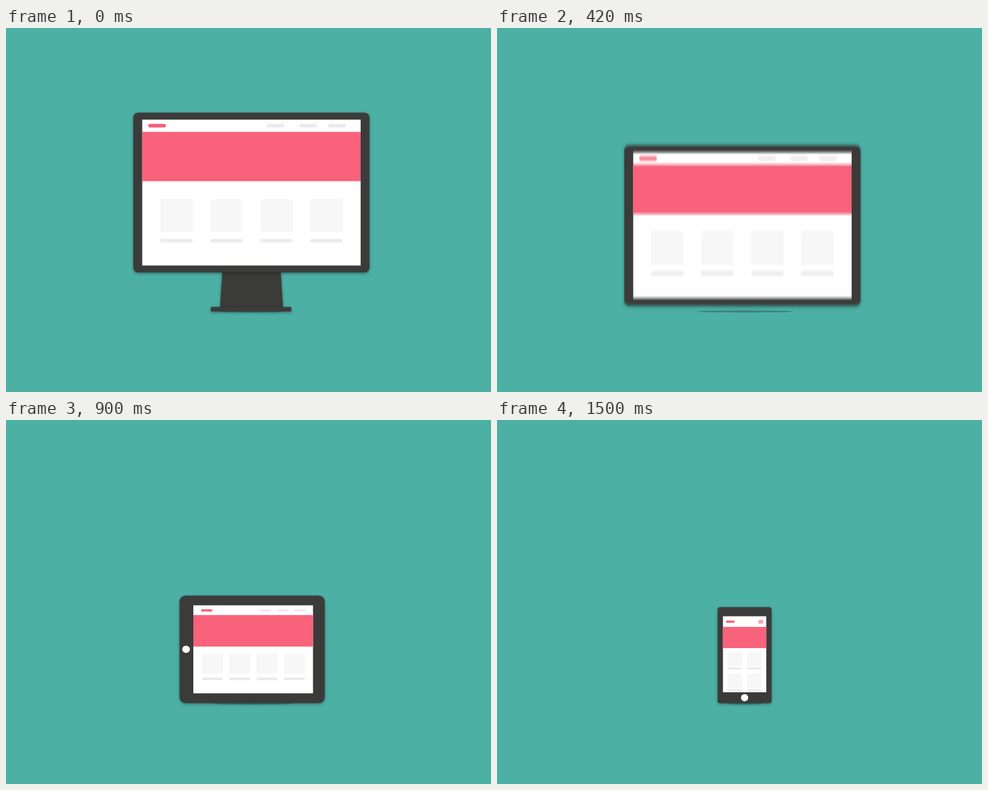
Animation, 800 px wide and 600 px high, one loop 1.68 s. Source, as an HTML page with a canvas:

```html
<!DOCTYPE html>
<html lang="en">
<head>
<meta charset="utf-8">
<title>Responsive devices</title>
<style>
  html, body { margin: 0; width: 100%; height: 100%; overflow: hidden; background: #4db0a5; }
  canvas { display: block; }
</style>
</head>
<body>
<canvas id="stage" width="800" height="600"></canvas>
<script>
const LOOP = 1680, STEP = 30;
const TEAL = '#4db0a5', DARK = '#3b3b3a', PINK = '#f8627b', LINE = '#ebebeb', CARD = '#f7f7f7';

const stage = document.getElementById('stage').getContext('2d');
const layer = document.createElement('canvas');
layer.width = 800;
layer.height = 600;
const ctx = layer.getContext('2d');

const sine = p => (1 - Math.cos(Math.PI * p)) / 2;
const steep = p => p < .5 ? (2 * p) ** 2.8 / 2 : 1 - (2 - 2 * p) ** 2.8 / 2;

// Value at time t along [time, value] keys, eased between neighbours.
function along(keys, t, ease = sine) {
  if (t <= keys[0][0]) return keys[0][1];
  for (let i = 1; i < keys.length; i++) {
    const [t0, a] = keys[i - 1], [t1, b] = keys[i];
    if (t < t1) return a + (b - a) * ease((t - t0) / (t1 - t0));
  }
  return keys[keys.length - 1][1];
}

function box(color, x, y, w, h, r = 0) {
  ctx.fillStyle = color;
  ctx.beginPath();
  ctx.roundRect(x, y, w, h, r);
  ctx.fill();
}

function oval(color, x, y, rx, ry) {
  ctx.fillStyle = color;
  ctx.beginPath();
  ctx.ellipse(x, y, rx, ry, 0, 0, 7);
  ctx.fill();
}

const pill = (color, x, y, w, h) => box(color, x, y, w, h, h / 2);

function shadowed(draw) {
  ctx.save();
  ctx.shadowColor = 'rgba(0,0,0,.4)';
  ctx.shadowBlur = 5;
  ctx.shadowOffsetY = 1.5;
  draw();
  ctx.restore();
}

// Scales sideways about cx and shifts down by dy.
function placed(cx, scale, dy, draw) {
  ctx.save();
  ctx.translate(cx, dy);
  ctx.scale(scale, 1);
  ctx.translate(-cx, 0);
  draw();
  ctx.restore();
}

function cards(xs, w, y, h, lineY, lineH) {
  for (const x of xs) {
    box(CARD, x, y, w, h, 2);
    pill(LINE, x, lineY, w, lineH);
  }
}

function stand() {
  shadowed(() => {
    ctx.fillStyle = DARK;
    ctx.beginPath();
    ctx.moveTo(357, 400);
    ctx.lineTo(453, 400);
    ctx.lineTo(457, 461);
    ctx.lineTo(353, 461);
    ctx.fill();
    box(DARK, 338, 459.7, 132.5, 7.5, 1);
  });
}

function monitor() {
  shadowed(() => box(DARK, 210, 139.5, 389.5, 263.5, 8));
  box('#fff', 224.7, 151, 360.3, 240.5);
  pill(PINK, 234.5, 158, 29.3, 6);
  for (const x of [430.3, 483.8, 531.2]) pill(LINE, x, 158, 29.3, 6);
  box(PINK, 224.7, 171.2, 360.3, 81.4);
  cards([254.5, 337, 419.4, 501.6], 53.5, 282, 54, 347.7, 5.8);
}

function tablet() {
  shadowed(() => box(DARK, 286.3, 289.4, 239.4, 177.4, 10));
  oval('#fff', 297, 378, 6.4, 6);
  box('#fff', 309, 305.5, 197.4, 145);
  pill(PINK, 321.5, 312, 19, 3.8);
  for (const x of [418.7, 447, 475.3]) pill(LINE, x, 312, 19, 3.8);
  box(PINK, 309, 321.6, 197.4, 51.8);
  cards([323.2, 368, 413.2, 458.2], 34.8, 385.3, 33, 424.3, 4.6);
}

function phone() {
  shadowed(() => box(DARK, 364, 308.5, 88.8, 158.3, 4));
  oval('#fff', 408.4, 457.8, 6, 6);
  box('#fff', 372.7, 323.5, 71.5, 125.3);
  pill(PINK, 377.8, 330.5, 14.4, 3.8);
  for (const y of [330, 332, 334]) box(PINK, 431.3, y, 7.7, 1.2);
  box(PINK, 372.7, 341, 71.5, 35);
  for (const y of [381.5, 417.5]) cards([380, 412.5], 24.4, y, 24.5, y + 26.3, 3.5);
}

function scene(t) {
  ctx.fillStyle = TEAL;
  ctx.fillRect(0, 0, 800, 600);

  const cx = along([[270, 404], [360, 403], [420, 410], [480, 415], [630, 415], [780, 407], [1260, 408]], t);
  const rx = along([[270, 52], [360, 35], [420, 80], [480, 105], [630, 105], [780, 65], [1140, 65], [1230, 30]], t);
  oval('rgba(20,40,40,.32)', cx, 467.3, rx, 1.7);

  if (t < 780) {
    const fall = along([[300, 0], [480, 64.4]], t, steep);
    const lift = along([[270, 0], [360, -64]], t);
    if (t < 360) placed(404, 1, lift, stand);
    placed(404.8, along([[630, 1], [780, .908]], t), fall, monitor);
  } else if (t < 1230) {
    placed(406, along([[780, .87], [900, 1], [1020, .94], [1140, .94], [1230, .86]], t), 0, tablet);
  } else {
    placed(408.4, along([[1230, .933], [1350, 1.05], [1500, 1]], t), 0, phone);
  }
}

function frame() {
  const t = Math.floor(performance.now() % LOOP / STEP) * STEP;
  // Average several moments while the screen drops to get motion blur.
  const samples = t > 300 && t < 480 ? 9 : 1;
  for (let i = 0; i < samples; i++) {
    scene(t + (i - (samples - 1) / 2) * 1.8);
    stage.globalAlpha = 1 / (i + 1);
    stage.drawImage(layer, 0, 0);
  }
  requestAnimationFrame(frame);
}
frame();
</script>
</body>
</html>
```
